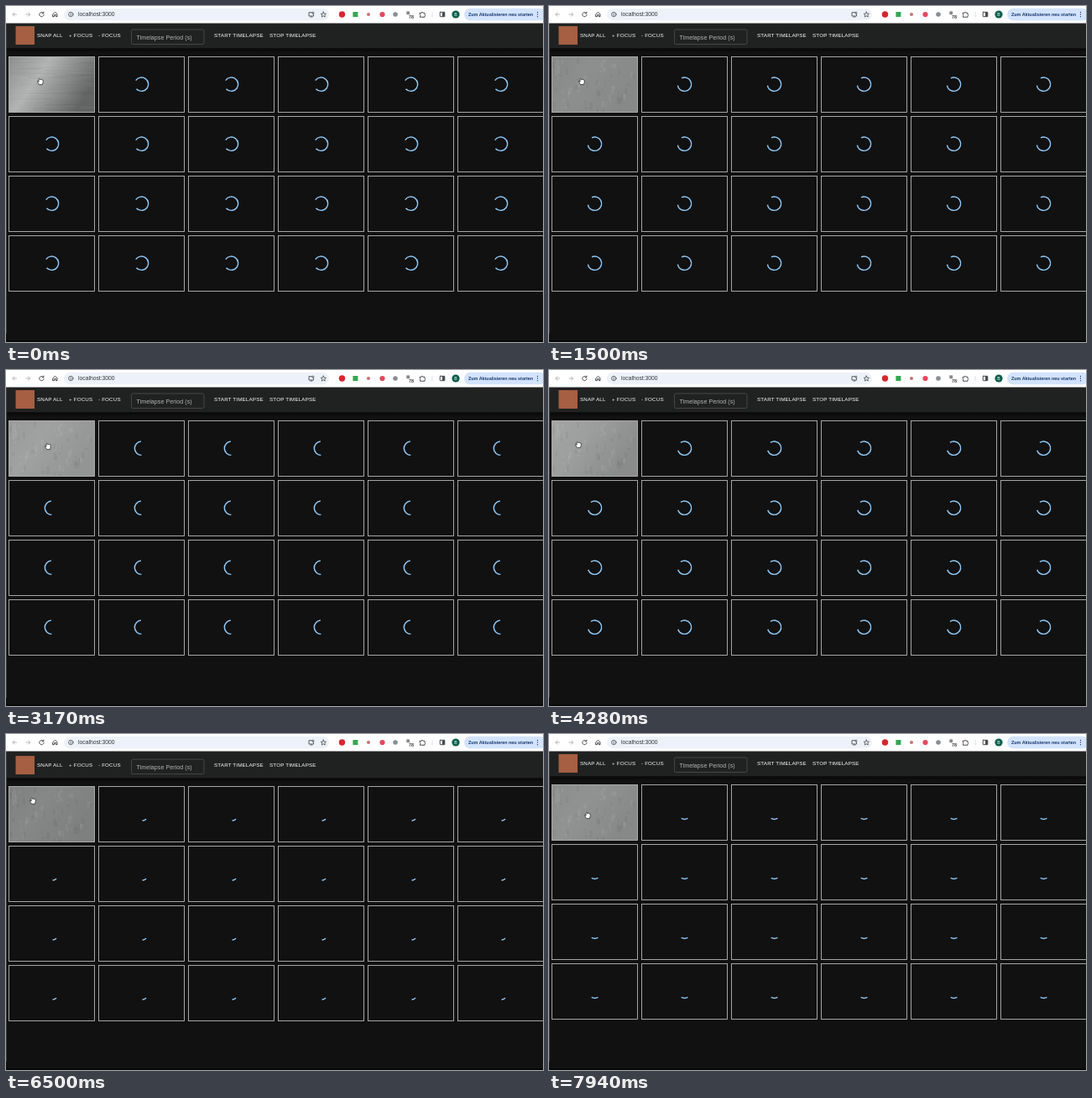
Write an HTML page that moves like this. It is 640 px wide and 400 px high and loops after 8 s.

```html
<!DOCTYPE html>
<html lang="en">
<head>
<meta charset="utf-8">
<title>Camera grid</title>
<style>
  html, body { margin: 0; width: 100%; height: 100%; overflow: hidden; background: #111; }
  svg { display: block; width: 100vw; height: 100vh; }
  text { font-family: "Liberation Sans", Arial, sans-serif; }
  .button { font-size: 6.22px; letter-spacing: .17px; fill: #fff; }
  .label { font-size: 7.1px; letter-spacing: .05px; fill: #b5b5b5; }
  .icon { fill: none; stroke: #474a4f; stroke-width: 1; stroke-linecap: round; stroke-linejoin: round; }
  .faint { stroke: #b4b7ba; }
</style>
</head>
<body>
<svg viewBox="0 0 640 400" preserveAspectRatio="none">
  <defs>
    <g id="spinner">
      <circle id="arc" r="20.2" fill="none" stroke="#90caf9" stroke-width="3.6"/>
    </g>
    <linearGradient id="metal" x1="0" y1="0" x2="1" y2=".45">
      <stop offset="0"/><stop offset=".42"/><stop offset="1"/>
    </linearGradient>
    <linearGradient id="shadow" x1="0" y1="0" x2="0" y2="1">
      <stop offset="0" stop-color="#080808"/><stop offset="1" stop-color="#111"/>
    </linearGradient>
    <clipPath id="view"><rect x="3.5" y=".5" width="102" height="66"/></clipPath>
  </defs>

  <rect width="640" height="400" fill="#111"/>
  <g id="header">
    <rect y="10" width="640" height="40.5" fill="#202121"/>
    <rect y="50.5" width="640" height="5" fill="url(#shadow)"/>
    <rect x="11.5" y="24" width="22.5" height="22" fill="#a65f43"/>
    <g class="button">
      <text x="37" y="37.3">SNAP ALL</text>
      <text x="75" y="37.3">+ FOCUS</text>
      <text x="110" y="37.3">- FOCUS</text>
      <text x="248" y="37.3">START TIMELAPSE</text>
      <text x="314" y="37.3">STOP TIMELAPSE</text>
    </g>
    <rect x="149.5" y="28" width="86.5" height="17.5" rx="1.8" fill="none" stroke="#505050" stroke-width=".8"/>
    <text class="label" x="155.5" y="39.5">Timelapse Period (s)</text>
  </g>
  <g id="photo">
    <g clip-path="url(#view)">
      <rect x="3" width="103" height="67" fill="url(#metal)"/>
      <g id="brushed"></g>
      <g id="mottled"></g>
    </g>
  </g>
  <g id="grid"></g>

  <path d="M.5 20V390" stroke="#3c3c3c"/>
  <rect y="398.5" width="640" height="1.5" fill="#050505"/>

  <g id="browser">
    <rect width="640" height="20.5" fill="#fff"/>
    <rect x="69" y="3" width="316" height="14.2" rx="7.1" fill="#edf1f9"/>
    <g class="icon">
      <path class="faint" d="M12.5 10H8M10 7.8L7.8 10L10 12.2M24 10H28.5M26.5 7.8L28.7 10L26.5 12.2"/>
      <path d="M44.4 8.4A2.6 2.6 0 1 0 45 10.6M44.9 7V8.8H43"/>
      <path d="M56 9.6L58.5 7.4L61 9.6V12.6H59.4V10.6H57.6V12.6H56Z"/>
      <circle cx="77.3" cy="10" r="2.7" stroke-width=".8"/>
      <path d="M77.3 9.8V11.4M77.3 8.6V8.7" stroke-width=".8"/>
      <path d="M365 7.7H361V12H366.5V10.5M363 13H365M366 7V9.3M364.9 8.4L366 9.5L367.2 8.4" stroke-width=".9"/>
      <path d="M378.3 7L379.2 9.1L381.5 9.3L379.8 10.8L380.3 13L378.3 11.8L376.3 13L376.8 10.8L375.1 9.3L377.4 9.1Z" stroke-width=".8"/>
      <path d="M493.5 8.3H495.2A1 1 0 0 1 497.2 8.3H499V10A1 1 0 0 1 499 11.8V13.2H493.5V11.8A1 1 0 0 0 493.5 10Z"/>
      <rect x="517.2" y="7.3" width="5.6" height="5.4" rx=".5"/>
    </g>
    <rect x="520" y="7.3" width="2.8" height="5.4" fill="#474a4f"/>
    <path d="M508 7V13.5" stroke="#d5e1f5"/>
    <circle cx="400.5" cy="10" r="3.7" fill="#d9262e"/>
    <rect x="413.4" y="7" width="6" height="6" fill="#34a853"/>
    <circle cx="432" cy="10" r="2" fill="#c67478"/>
    <circle cx="448.5" cy="10" r="3.1" fill="#e5485d"/>
    <circle cx="464" cy="10" r="2.8" fill="#8b8e92"/>
    <rect x="477.3" y="6.4" width="3.8" height="3.8" fill="#85888c"/>
    <text x="480" y="14.9" font-size="5.4" font-weight="700" fill="#3b3d40">78</text>
    <circle cx="536" cy="10" r="4.6" fill="#0b5f4c"/>
    <text x="536" y="11.8" font-size="5" text-anchor="middle" fill="#fff">B</text>
    <rect x="546" y="2.8" width="97" height="14.5" rx="7.2" fill="#d3e3fd"/>
    <text x="551" y="12" font-size="5.4" font-weight="700" fill="#183a70">Zum Aktualisieren neu starten</text>
    <path d="M633.5 7.4V7.5M633.5 10V10.1M633.5 12.6V12.7" stroke="#183a70" stroke-width="1.3" stroke-linecap="round"/>
    <text x="86" y="12.3" font-size="6.75" fill="#303236">localhost:3000</text>
  </g>

  <path id="hand" d="M-1.9 .3L-3.3-.7Q-4-.2-3.3 .7L-1.4 3.6H2.4L3.2 .8V-1.8Q2.6-2.6 2.1-1.8Q1.4-3 .8-2.2Q.1-3.3-.5-2.4L-.7-3.2Q-1.5-4-2-3.1Z"
    fill="#fff" stroke="#222" stroke-width=".75" stroke-linejoin="round"/>
</svg>

<script>
const LOOP = 8000, STEP = 1000 / 18, SPIN = 1400, SPIN_START = 0.475;
const GRID_TOP = 60.4, ROW_PITCH = 70.75;
const $ = id => document.getElementById(id);
const rows = [];

function add(parent, tag, attrs) {
  const el = document.createElementNS("http://www.w3.org/2000/svg", tag);
  for (const key in attrs) el.setAttribute(key, attrs[key]);
  return parent.appendChild(el);
}

function buildGrid() {
  for (let row = 0; row < 4; row++) {
    const group = add($("grid"), "g");
    rows.push(group);
    for (let col = 0; col < 6; col++) {
      const x = 3 + col * 107;
      add(group, "rect", { x: x + .5, y: .5, width: 102, height: 66, fill: "none", stroke: "#b4b4b4", "stroke-width": .9 });
      if (row || col) add(group, "use", { href: "#spinner", transform: `translate(${x + 51.5} 33.2) scale(.4045)` });
    }
  }
}

// Faint surface marks: long horizontal scratches, then short upright flecks.
function buildTexture() {
  let seed = 7;
  const random = () => (seed = seed * 16807 % 2147483647) / 2147483647;
  const mark = (group, width, height, opacity) => add($(group), "rect", {
    x: 3 + random() * 98, y: random() * 66, width, height,
    fill: random() < .5 ? "#fff" : "#222", opacity
  });
  for (let i = 0; i < 80; i++) mark("brushed", 10 + random() * 40, .6, .07);
  for (let i = 0; i < 70; i++) mark("mottled", 1 + random() * 3, 1 + random() * 8, .06);
}

// Each key is [time, ...values]; values run linearly between keys.
function sample(keys, t) {
  const i = keys.findIndex(key => key[0] > t);
  if (i < 0) return keys[keys.length - 1].slice(1);
  const a = keys[i - 1], b = keys[i], k = (t - a[0]) / (b[0] - a[0]);
  return a.slice(1).map((v, j) => v + (b[j + 1] - v) * k);
}

const scroll = [[0, 0], [200, 0], [400, 2], [750, 2], [1000, 1], [1400, 0], [5060, 0],
  [5350, 2], [5830, .6], [6300, 2], [6940, 2.3], [7200, 2.6], [7500, 1], [7750, 0]];
const pointer = [[0, 41, 90], [1500, 39, 90], [3170, 50, 91], [4280, 35, 89],
  [5830, 32, 80], [6940, 32, 79.5], [7940, 46, 97]];
const shades = [[0, 140, 178, 100], [700, 138, 165, 112], [1500, 134, 141, 135], [3170, 153, 160, 147],
  [4280, 163, 157, 138], [5830, 108, 117, 113], [6940, 137, 145, 135], [7940, 139, 145, 135]];
const stops = document.querySelectorAll("#metal stop");

// The curve of cubic-bezier(.42, 0, .58, 1).
function easeInOut(x) {
  let low = 0, high = 1, s = .5;
  for (let i = 0; i < 20; i++) {
    s = (low + high) / 2;
    if (1.26 * s * (1 - s) ** 2 + 1.74 * s * s * (1 - s) + s ** 3 < x) low = s; else high = s;
  }
  return s * s * (3 - 2 * s);
}

function drawSpinner(t) {
  const p = (SPIN_START + t / SPIN) % 1, growing = p < .5;
  const k = easeInOut(growing ? p * 2 : p * 2 - 1);
  const length = growing ? 1 + 99 * k : 100;
  const start = growing ? 15 * k : 15 + 110 * k;
  $("arc").setAttribute("stroke-dasharray", `${length} 200`);
  $("arc").setAttribute("stroke-dashoffset", -start);
  $("arc").setAttribute("transform", `rotate(${p * 360})`);
}

const moveTo = (el, x, y) => el.setAttribute("transform", `translate(${x} ${y})`);

// Rows snap to whole pixels one by one, as the page slides by fractions.
function drawScroll(offset) {
  const rowTop = row => Math.round(GRID_TOP + row * ROW_PITCH + offset);
  moveTo($("header"), 0, offset);
  moveTo($("photo"), 0, rowTop(0));
  rows.forEach((group, row) => moveTo(group, 0, rowTop(row)));
}

function draw(now) {
  const t = Math.floor((now % LOOP + 5) / STEP) * STEP;
  drawSpinner(t);
  drawScroll(sample(scroll, t)[0]);
  moveTo($("hand"), ...sample(pointer, t));
  sample(shades, t).forEach((v, i) => stops[i].setAttribute("stop-color", `rgb(${v},${v + 2},${v + 1})`));
  const worn = Math.min(1, t / 1200);
  $("brushed").setAttribute("opacity", 1 - worn);
  $("mottled").setAttribute("opacity", worn);
}

buildGrid();
buildTexture();
const began = performance.now();
function tick() {
  draw(performance.now() - began);
  requestAnimationFrame(tick);
}
tick();
</script>
</body>
</html>
```
